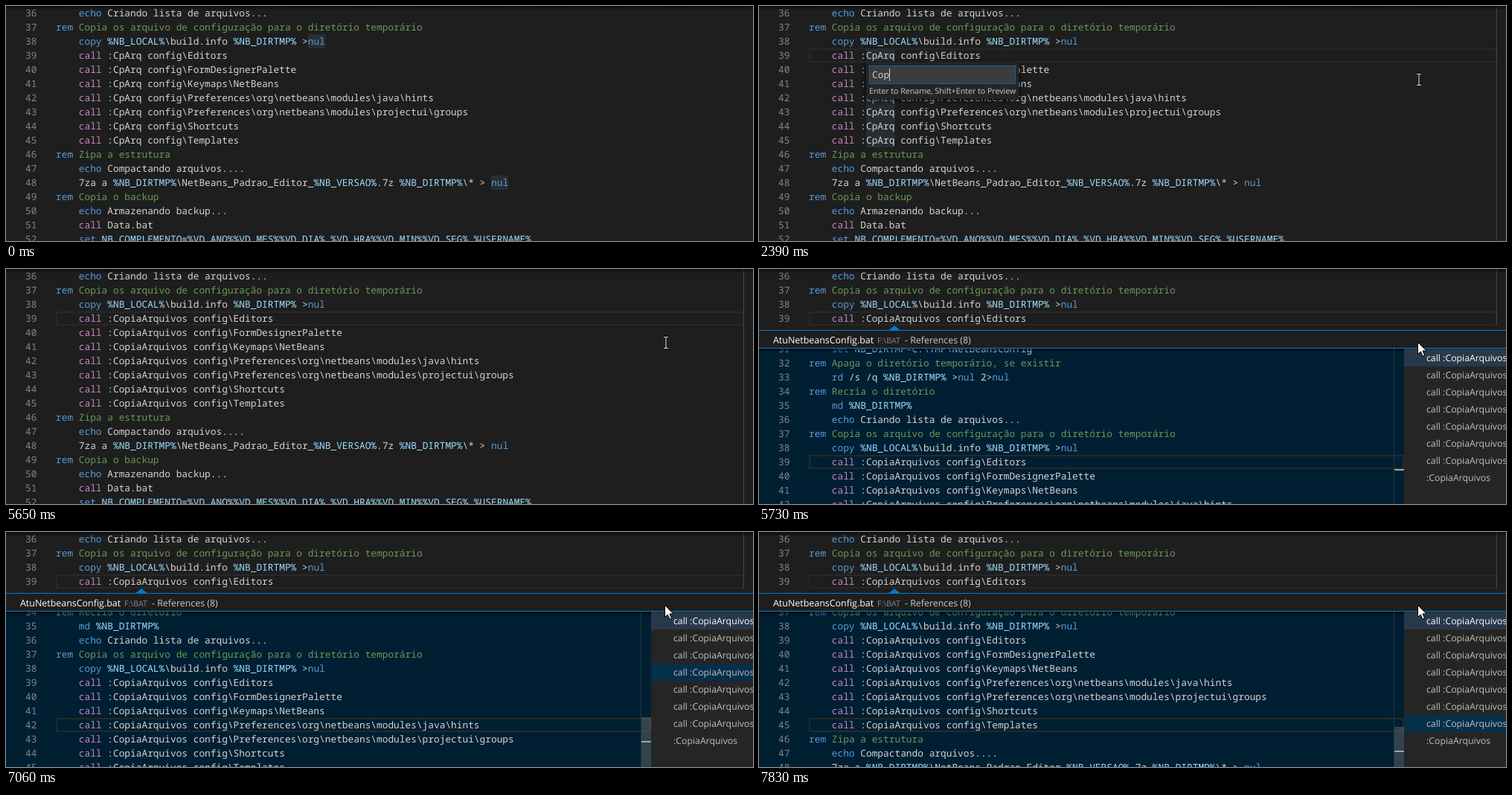
These frames come from a looping animation (1004 px wide and 316 px high, 8 s). An HTML page:

```html
<!DOCTYPE html>
<html lang="pt">
<head>
<meta charset="utf-8">
<title>Rename symbol and peek references</title>
<style>
  html, body { margin: 0; width: 100%; height: 100%; overflow: hidden; background: #1e1e1e; }
  svg { display: block; }
  text { white-space: pre; text-rendering: geometricPrecision; }
  .mono { font: 12.83px "Noto Sans Mono", "DejaVu Sans Mono", monospace; }
  .ui { font-family: "Open Sans", "Noto Sans", sans-serif; }
</style>
</head>
<body>
<script>
const LOOP = 8000, CHAR = 7.698, ROW = 19, LEFT = 67, FIRST = 36;
const NEW_NAME = "CopiaArquivos", OLD_NAME = "CpArq";
const BG = "#1e1e1e", TEXT = "#d4d4d4", BLUE = "#569cd6", ACCENT = "#007acc";

const SOURCE = String.raw`    set NB_DIRTMP=C:\TMP\NetbeansConfig
rem Apaga o diretório temporário, se existir
    rd /s /q %NB_DIRTMP% >nul 2>nul
rem Recria o diretório
    md %NB_DIRTMP%
    echo Criando lista de arquivos...
rem Copia os arquivo de configuração para o diretório temporário
    copy %NB_LOCAL%\build.info %NB_DIRTMP% >nul
    call :@ config\Editors
    call :@ config\FormDesignerPalette
    call :@ config\Keymaps\NetBeans
    call :@ config\Preferences\org\netbeans\modules\java\hints
    call :@ config\Preferences\org\netbeans\modules\projectui\groups
    call :@ config\Shortcuts
    call :@ config\Templates
rem Zipa a estrutura
    echo Compactando arquivos....
    7za a %NB_DIRTMP%\NetBeans_Padrao_Editor_%NB_VERSAO%.7z %NB_DIRTMP%\* > nul
rem Copia o backup
    echo Armazenando backup...
    call Data.bat
    set NB_COMPLEMENTO=%VD_ANO%%VD_MES%%VD_DIA%_%VD_HRA%%VD_MIN%%VD_SEG%_%USERNAME%`
  .split("\n").map((code, i) => ({ n: 31 + i, code }));

function el(tag, attrs, parent, content) {
  const node = document.createElementNS("http://www.w3.org/2000/svg", tag);
  for (const k in attrs) node.setAttribute(k, attrs[k]);
  if (content !== undefined) node.textContent = content;
  if (parent) parent.appendChild(node);
  return node;
}
const rect = (parent, x, y, width, height, fill, more) =>
  el("rect", { x, y, width, height, fill, ...more }, parent);
const label = (parent, x, y, size, fill, str) =>
  el("text", { class: "ui", x, y, "font-size": size, fill }, parent, str);
const group = (parent, attrs) => el("g", attrs || {}, parent);
const show = (node, on) => node.setAttribute("display", on ? "inline" : "none");
const move = (node, x, y) => node.setAttribute("transform", `translate(${x} ${y})`);

function tokens(code) {
  if (code.startsWith("rem")) return [["rem", BLUE], [code.slice(3), "#6a9955"]];
  return code.split(/(%\w+%|NB_\w+(?==)|\b(?:echo|copy|set|md|rd|nul|call)\b)/)
    .filter(Boolean)
    .map(s => [s, s === "call" ? "#c586c0"
      : /^(%\w+%|NB_\w+)$/.test(s) ? "#9cdcfe"
      : /^(echo|copy|set|md|rd|nul)$/.test(s) ? BLUE : TEXT]);
}

// Draws numbered lines; line `base` has its top edge at `top`.
function drawCode(parent, lines, name, base, top) {
  for (const { n, code } of lines) {
    const y = top + (n - base) * ROW + 14;
    el("text", { class: "mono", x: 41.4, y, fill: "#858585", "text-anchor": "end" }, parent, n);
    const str = code.replace("@", name), body = str.trimStart();
    const t = el("text", { class: "mono", x: LEFT + (str.length - body.length) * CHAR, y }, parent);
    for (const [s, fill] of tokens(body)) el("tspan", { fill }, t, s);
  }
}
const lineBox = (parent, y, right) =>
  rect(parent, LEFT + 1, y + 1, right - LEFT - 1, ROW - 2, "none", { stroke: "#282828", "stroke-width": 2 });

const svg = el("svg", { width: 1004, height: 316, viewBox: "0 0 1004 316" }, document.body);
const defs = el("defs", {}, svg);
const fade = el("linearGradient", { id: "fade", x2: 0, y2: 1 }, defs);
el("stop", { offset: 0, "stop-color": "#000", "stop-opacity": 0.6 }, fade);
el("stop", { offset: 1, "stop-color": "#000", "stop-opacity": 0 }, fade);
const blur = el("filter", { id: "blur", x: "-20%", y: "-40%", width: "140%", height: "180%" }, defs);
el("feGaussianBlur", { stdDeviation: 4 }, blur);

// Main editor
rect(svg, 0, 0, 1004, 316, BG);
const active = group(svg);
lineBox(active, 57, 991);
rect(active, 991, 0, 1, 316, "#444");

const nulMarks = group(svg);
rect(nulMarks, 406, 38, 23, ROW, "#2a2e34");
rect(nulMarks, 652, 228, 23, ROW, "#2a2e34");
const nameMarks = group(svg);
for (let i = 0; i < 7; i++) rect(nameMarks, 144, 57 + i * ROW, 38.5, ROW, "inherit").removeAttribute("fill");

const visible = SOURCE.filter(l => l.n >= FIRST);
const before = group(svg), after = group(svg);
drawCode(before, visible, OLD_NAME, FIRST, 0);
drawCode(after, visible, NEW_NAME, FIRST, 0);
const caret = rect(svg, 181, 57, 2, ROW, "#aeafad");
rect(svg, 0, 0, 1004, 6, "url(#fade)");

// Rename box
const rename = group(svg);
rect(rename, 144, 78, 205, 48, "#000", { filter: "url(#blur)" });
rect(rename, 144, 76, 205, 49, "#252526");
rect(rename, 148.5, 80.5, 196, 24, "#3c3c3c", { stroke: "#0e639c" });
const selection = rect(rename, 152, 84, 38.5, 17, "#264f78");
const typed = el("text", { class: "mono", x: 152, y: 97, fill: "#cccccc" }, rename);
const typeCaret = rect(rename, 0, 84, 1, 17, "#d4d4d4");
label(rename, 148, 118, 10.63, "#cccccc", "Enter to Rename, Shift+Enter to Preview");

// Reference peek
const peek = group(svg);
rect(peek, 0, 76, 1004, 240, BG);
el("path", { d: "M174 82.5L182 76L190 82.5Z", fill: ACCENT }, peek);
label(peek, 19, 100, 12.45, "#ffffff", "AtuNetbeansConfig.bat");
label(peek, 159, 99.5, 10.7, "#8a8a8a", "F:\\BAT");
label(peek, 196, 100, 12.4, "#cccccc", "- References (8)");

const pane = el("svg", { x: 0, y: 107, width: 867, height: 209, overflow: "hidden" }, peek);
rect(pane, 0, 0, 867, 209, "#001f33");
lineBox(pane, 143, 866);
const scroll = group(pane);
drawCode(scroll, SOURCE, NEW_NAME, 39, 143);
rect(pane, 0, 0, 867, 6, "url(#fade)");
rect(pane, 853, 0, 1, 209, "#1f3644");
const slider = rect(pane, 854, 0, 13, 209, "#797979", { "fill-opacity": 0.4 });
const mark = rect(pane, 854, 0, 13, 2, "#a5a39c");

rect(peek, 867, 107, 137, 209, "#252526");
const picked = rect(peek, 867, 0, 137, 23, "#062f4a");
rect(peek, 867, 108, 137, 23, "#28394a");
for (let i = 0; i < 8; i++)
  label(peek, 897, 124 + i * 23, 12.3, i ? "#c0c0c0" : "#ffffff", (i < 7 ? "call :" : ":") + NEW_NAME);
rect(peek, 0, 82, 1004, 1, ACCENT);
rect(peek, 0, 106, 1004, 1, ACCENT);

// Pointers
const beam = group(svg);
const beamPath = "M-3 -7.5H-1Q0 -7.5 0 -6.5Q0 -7.5 1 -7.5H3M0 -6.5V6.5M-3 7.5H-1Q0 7.5 0 6.5Q0 7.5 1 7.5H3";
el("path", { d: beamPath, fill: "none", stroke: "#000", "stroke-width": 2.4 }, beam);
el("path", { d: beamPath, fill: "none", stroke: "#e6e6e6", "stroke-width": 1.1 }, beam);
const arrow = el("path", {
  d: "M885.5 98.5V114.5L889.3 111L892 117L894.6 115.9L892 110H897Z",
  fill: "#fff", stroke: "#000", "stroke-width": 1
}, svg);

// Moments: [time, number of typed characters]
const TYPING = [[1930, 1], [2240, 2], [2390, 3], [2470, 5], [2870, 6], [3110, 7], [3410, 8],
  [3570, 9], [3650, 11], [3720, 12], [3880, 13]];
const PICKS = [6510, 6760, 7060, 7300, 7530, 7830];
const DASH = [[920, 270, 71], [1000, 530, 83], [1080, 770, 95], [1150, 887, 99]];
const within = (t, a, b) => t >= a && t < b;
const last = (list, t) => list.filter(e => e[0] <= t).pop();

function pointer(t) {
  const dash = last(DASH, t);
  if (dash) return dash.slice(1);
  const u = Math.min(1, Math.floor((t - 70) / 78) / 10), v = 1 - u;
  const curve = (a, b, c) => Math.round(a * v * v + 2 * b * u * v + c * u * u);
  return [curve(150, 15, 181), curve(312, 160, 67)];
}

function draw(t) {
  show(nulMarks, t < 850);
  show(active, t >= 850);
  show(nameMarks, within(t, 1150, 4180));
  nameMarks.setAttribute("fill", t < 1390 ? "#343b42" : "#282d32");
  show(before, t < 4180);
  show(after, t >= 4180);
  show(caret, within(t, 850, 1330) || within(t, 4180, 4650) || within(t, 5190, 5650));

  show(rename, within(t, 1390, 4180));
  const key = last(TYPING, t);
  const str = key ? NEW_NAME.slice(0, key[1]) : OLD_NAME;
  typed.textContent = str;
  typeCaret.setAttribute("x", Math.round(152 + str.length * CHAR));
  show(selection, within(t, 1470, 1930));

  const open = t >= 5730;
  const step = PICKS.filter(p => p <= t).length;
  show(peek, open);
  move(scroll, 0, -step * ROW);
  show(slider, step > 0);
  slider.setAttribute("y", Math.round((30.5 + step) * 4.25));
  mark.setAttribute("y", Math.round((38 + step) * 4.25));
  picked.setAttribute("y", 108 + step * 23);

  show(beam, t >= 70 && !open);
  move(beam, ...pointer(t));
  show(arrow, open);
}

function tick() {
  draw(performance.now() % LOOP);
  requestAnimationFrame(tick);
}
tick();
</script>
</body>
</html>
```
